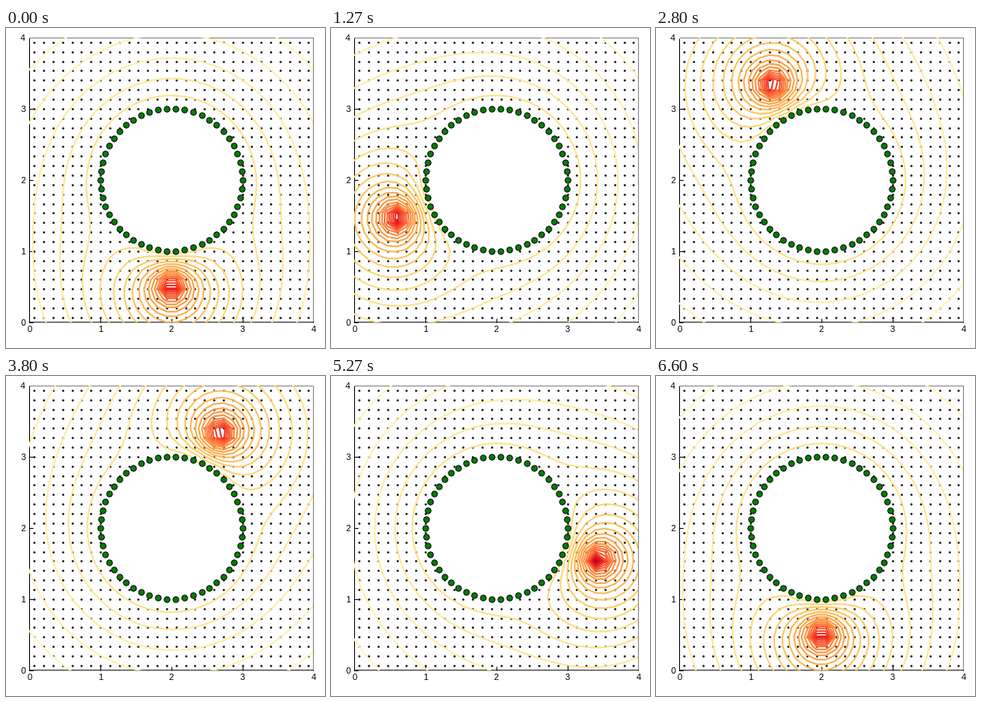
Write a matplotlib script that moves like this. It is 399x400 px and loops after 6670 ms.

```python
import numpy as np
import matplotlib.pyplot as plt
from matplotlib.animation import FuncAnimation

W, H, DPI = 399, 400, 100
PX = 72 / DPI
STEPS, TICKS, LOOP = 100, 3, 6670
LEFT, RIGHT, TOP, BOTTOM = 29.3, 384.4, 11.9, 367.8

CENTER = 2 + 2j
RADIUS, ORBIT = 1.0, 1.5
INDUCED = 1.08  # strength of the induced charge on the ring
CELL = 4 / 30
LEVELS = -0.353 + 0.1525 * np.arange(-6, 23)

plt.rcParams["font.family"] = "Liberation Sans"
fig = plt.figure(figsize=(W / DPI, H / DPI), dpi=DPI, facecolor="white")
ax = fig.add_axes([LEFT / W, 1 - BOTTOM / H,
                   (RIGHT - LEFT) / W, (BOTTOM - TOP) / H])
ax.set(xlim=(0, 4), ylim=(0, 4), xticks=range(5), yticks=range(5))
ax.tick_params(direction="in", length=5 * PX, width=PX,
               labelsize=11 * PX, zorder=6)
ax.tick_params(axis="x", pad=4 * PX)
ax.tick_params(axis="y", pad=5 * PX)
for side, spine in ax.spines.items():
    main = side in ("left", "bottom")
    spine.set(linewidth=PX, color="black" if main else "#808080")
ax.spines["bottom"].set_snap(False)

# cell centres, with one extra ring so contours run to the frame
nodes = (np.arange(-1, 31) + 0.5) * CELL
gx, gy = np.meshgrid(nodes, nodes)
grid = gx + 1j * gy
outside = abs(grid - CENTER) > RADIUS

ax.plot(gx[outside], gy[outside], "o", color="black",
        ms=2.6 * PX, mew=0, zorder=2)
ring = CENTER + RADIUS * np.exp(2j * np.pi * np.arange(50) / 50)
ax.plot(ring.real, ring.imag, "o", mfc="#008000", mec="black",
        ms=7.2 * PX, mew=PX, zorder=4)


def potential(angle):
    """Line charge beside a neutral cylinder, by image charges."""
    arm = -1j * np.exp(-1j * angle)
    charge = CENTER + ORBIT * arm
    image = CENTER + RADIUS ** 2 / ORBIT * arm
    r, ri, rc = (np.maximum(abs(grid - p), 1e-6)
                 for p in (charge, image, CENTER))
    u = INDUCED * np.log(ri / rc) - np.log(r)
    return np.where(outside, u, -np.log(ORBIT))


contours, shown = None, None


def draw(i):
    """Hold each step for TICKS ticks."""
    global contours, shown
    step = (i + 1) // TICKS % STEPS
    if step == shown:
        return []
    if contours is not None:
        contours.remove()
    angle = 2 * np.pi * step / (STEPS - 1)
    contours = ax.contour(gx, gy, potential(angle), levels=LEVELS,
                          cmap="YlOrRd", vmin=-1.4, vmax=3.2,
                          linewidths=2 * PX, linestyles="solid", zorder=3)
    shown = step
    return []


anim = FuncAnimation(fig, draw, frames=STEPS * TICKS, init_func=lambda: [],
                     interval=LOOP / (STEPS * TICKS),
                     repeat=True, repeat_delay=0)
plt.show()
```
